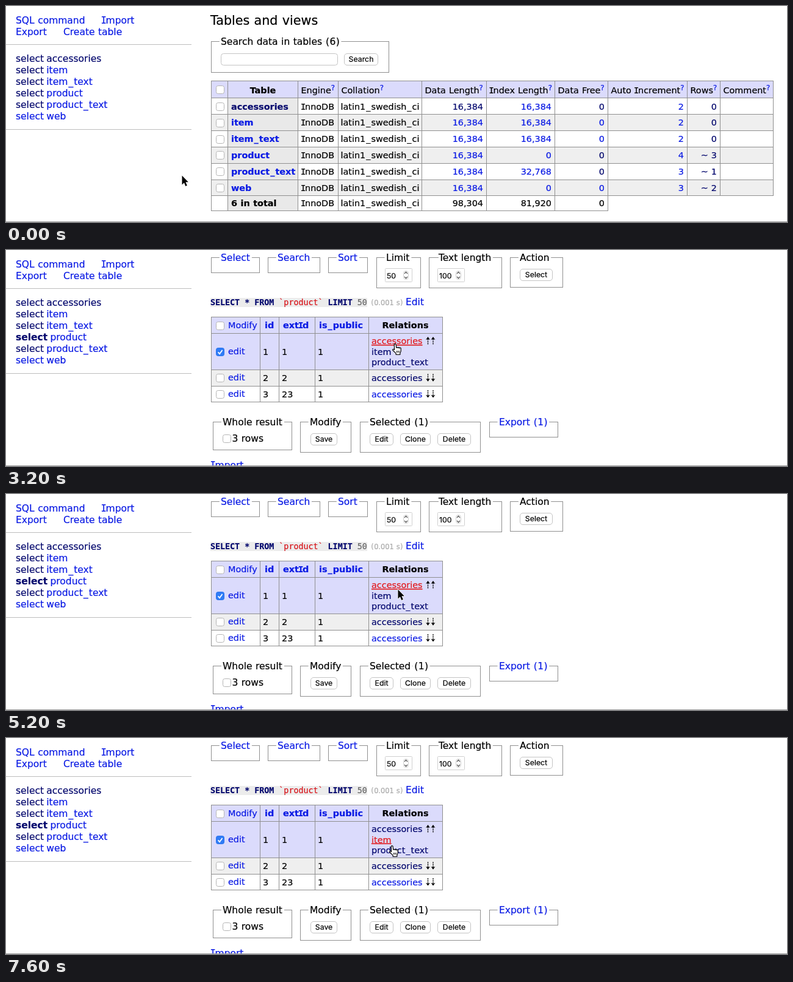
Write an HTML page that moves like this. It is 1280 px wide and 356 px high and loops after 8 s.

```html
<!DOCTYPE html>
<html lang="en">
<head>
<meta charset="utf-8">
<title>Database admin</title>
<style>
  html, body { margin: 0; width: 100%; height: 100%; overflow: hidden; background: #fff; }
  svg { display: block; width: 1280px; height: 356px; }
  text { font: 15.5px "DejaVu Sans", sans-serif; word-spacing: .034em; white-space: pre; color: #000; }
  text, tspan { fill: currentColor; stroke: currentColor; stroke-width: .2px; }
  rect, .line { shape-rendering: crispEdges; }
  .round { shape-rendering: auto; }
  .t { font-size: 14.4px; }
  .h { font-size: 20.7px; }
  .b { font-weight: bold; }
  .u { font: 12.3px Inter, sans-serif; word-spacing: 0; }
  .m { font: 13.34px "DejaVu Sans Mono", monospace; word-spacing: 0; }
  .s { font-size: 11.4px; color: #aaa; }
  .l { color: #0b1be4; }
  .v { color: #05096e; }
  .hot { color: #e2191c; text-decoration: underline; }
  .r { color: #d8141a; }
  .g { color: #666; }
  .off { color: #bdbdbd; }
  .end { text-anchor: end; }
  .mid { text-anchor: middle; }
  .halo { color: #fff; stroke-width: 8px; stroke-linejoin: round; }
  .halo tspan { stroke-width: 8px; }
  .serif { font-family: "DejaVu Sans Mono", monospace; }
</style>
</head>
<body>
<svg id="stage" viewBox="0 0 1280 356"></svg>
<script>
const stage = document.getElementById('stage');
const STEP = 400;
const HEAD = '#dbdbfc', STRIPE = '#efefef', GREY = '#e9e9e9', EDGE = '#8f8f8f';

// Side bearings, in em, that give some letters a wider setting; capital I takes a serif form.
const BEARING = { '_': .07, '(': .032, ')': .032, 'I': -.09 };
const spaced = s => String(s).replace(/[_()I]/g, c =>
  `<tspan dx="${BEARING[c]}em" style="letter-spacing:${BEARING[c]}em" class="${c === 'I' ? 'serif' : ''}">${c}</tspan>`);

const text = (x, y, s, cls = '') =>
  `<text x="${x}" y="${y}" class="${cls}">${/\b[um]\b/.test(cls) ? s : spaced(s)}</text>`;
const rect = (x, y, w, h, fill, more = '') =>
  `<rect x="${x}" y="${y}" width="${w}" height="${h}" fill="${fill}" ${more}/>`;
const path = (d, more) => `<path d="${d}" ${more}/>`;
const line = (x1, y1, x2, y2, color = EDGE) =>
  path(`M${x1} ${y1}L${x2} ${y2}`, `class="line" stroke="${color}" fill="none"`);
const round = (x, y, w, h, r, edge = '#c4c4c4', fill = '#fff') =>
  rect(x + .5, y + .5, w - 1, h - 1, fill, `rx="${r}" stroke="${edge}" class="round"`);

const fieldset = (x, y, w, h, legend, cls = '') =>
  rect(x + .5, y + .5, w, h, 'none', `stroke="${EDGE}"`) +
  text(x + 16, y + 6, legend, 'halo') + text(x + 16, y + 6, legend, cls);
const button = (x, y, w, label, off) =>
  round(x, y, w, 20, 4.5) + text(x + w / 2, y + 14.4, label, 'u mid' + (off ? ' off' : ''));
const check = (x, y, on) => on
  ? round(x, y, 14, 14, 3, '#2a74ee', '#2f7cf6') +
    path(`M${x + 3.6} ${y + 7.4}l2.5 2.8l4.4 -6.2`, 'fill="none" stroke="#fff" stroke-width="1.8"')
  : round(x, y, 14, 14, 3, '#b4b4b4');
const chevrons = (x, y, color) =>
  path(`M${x - 2.6} ${y - 2.4}l2.6 -2.8l2.6 2.8M${x - 2.6} ${y + 2.4}l2.6 2.8l2.6 -2.8`,
    `fill="none" stroke="${color}" stroke-width="1.3"`);
const number = (x, n) => round(x, 30, 45, 23, 1, '#d0d0d0') +
  text(x + 3, 46.5, n, 'u') + round(x + 30, 34, 9, 15, 4, '#cfcfcf') + chevrons(x + 34.5, 41.5, '#555');
const dropdown = (x, y, w, label) =>
  round(x, y, w, 20, 4.5) +
  path(`M${x + w - 17} ${y}h12.5a4.5 4.5 0 0 1 4.5 4.5v11a4.5 4.5 0 0 1 -4.5 4.5h-12.5z`, 'fill="#3a83f7"') +
  chevrons(x + w - 8.5, y + 10, '#fff') + text(x + 8, y + 14, label, 'u');

function arrows(y, up) {
  const one = x => `<g transform="translate(${x} ${y}) scale(1 ${up ? -1 : 1})">` +
    path('M0 -6V3', 'stroke="#000" stroke-width="1.3" stroke-dasharray="2.2 1"') +
    path('M-3.4 1.6L0 2.8L3.4 1.6L0 6.4z', 'fill="#000"') + '</g>';
  return one(691.5) + one(700);
}

// Cell borders; the last row may stop at an earlier column.
function grid(xs, ys, fills, lastX = xs[xs.length - 1]) {
  const left = xs[0], right = xs[xs.length - 1], last = ys.length - 1;
  let out = '';
  fills.forEach((f, i) => { if (f) out += rect(left, ys[i], right - left, ys[i + 1] - ys[i], f); });
  ys.forEach((y, i) => out += line(left, y + .5, (i === last ? lastX : right) + 1, y + .5));
  xs.forEach(x => out += line(x + .5, ys[0], x + .5, ys[x <= lastX ? last : last - 1]));
  return out;
}

const names = ['accessories', 'item', 'item_text', 'product', 'product_text', 'web'];

function sidebar(current, hover) {
  let out = text(16, 28.5, 'SQL command', 'l') + text(157, 28.5, 'Import', 'l') +
    text(16, 47.5, 'Export', 'l') + text(94, 47.5, 'Create table', 'l') +
    line(0, 63.5, 304, 63.5, '#bdbdbd') + line(0, 203.5, 304, 203.5, '#bdbdbd');
  names.forEach((name, i) => {
    const y = 92.3 + i * 18.85, bold = name === current;
    out += text(16, y, 'select', hover === 'side ' + name ? 'hot' : (name === 'web' ? 'l' : 'v') + (bold ? ' b' : ''));
    out += text(bold ? 72.5 : 66.3, y, name, i ? 'l' : 'v');
  });
  return out;
}

function home({ hover }) {
  const xs = [336, 363, 478, 544, 681, 787, 899, 986, 1116, 1170, 1257];
  const ys = [123, 151, 178, 205, 232, 259, 286, 312, 337];
  const heads = ['Engine', 'Collation', 'Data Length', 'Index Length', 'Data Free', 'Auto Increment', 'Rows', 'Comment'];
  const index = ['16,384', '16,384', '16,384', '0', '32,768', '0'];
  const free = ['v', 'l', 'l', 'v', 'v', 'l'];
  const auto = [2, 2, 2, 4, 3, 3], rows = ['0', '0', '0', '~ 3', '~ 1', '~ 2'];
  let out = sidebar('', hover) + text(335, 31, 'Tables and views', 'h') +
    fieldset(336, 58, 291, 51, 'Search data in tables (6)') +
    round(352, 78, 192, 20, 4) + button(554, 78, 56, 'Search');
  out += grid(xs, ys, [HEAD, 0, STRIPE, 0, STRIPE, 0, STRIPE, 0], 986);
  out += rect(364, 152, 114, 185, GREY);
  ys.slice(1).forEach(y => out += line(363, y + .5, 479, y + .5));
  out += check(344, 131) + text(421, 144, 'Table', 't b mid');
  heads.forEach((h, i) => out += text(xs[i + 2] + 5.5, 144.3,
    h + '<tspan dy="-5" font-size="11.8" class="l">?</tspan>', 't'));
  for (let i = 0; i < 7; i++) {
    const y = i < 6 ? 170.5 + i * 26.8 : 330.3, last = i === 6;
    const num = (x, s, cls) => text(x, y, s, 't end ' + (last ? '' : cls));
    out += text(369, y, last ? '6 in total' : names[i], 't b ' + (last ? '' : i ? 'l' : 'v')) +
      text(484, y, 'InnoDB', 't') + text(548.5, y, 'latin1_swedish_ci', 't') +
      num(782, last ? '98,304' : '16,384', i ? 'l' : 'v') +
      num(894, last ? '81,920' : index[i], 'l') + num(981, '0', free[i]);
    if (!last) out += check(344, Math.round(y - 11.5)) + num(1111, auto[i], 'l') + num(1165, rows[i], 'v');
  }
  return out;
}

// Form controls above a result; dx is the room taken by the search form.
function controls(dx, withLength) {
  const action = 826 + dx - (withLength ? 0 : 132);
  let out = fieldset(336, 12, 79, 25, 'Select', 'l') +
    fieldset(429, 12, dx ? 445 : 85, dx ? 76 : 25, 'Search', 'l') +
    fieldset(528 + dx, 12, 64, 25, 'Sort', 'l') +
    fieldset(607 + dx, 12, 72, 50, 'Limit') + number(621 + dx, 50) +
    fieldset(action, 12, 86, 49, 'Action') + button(action + 16, 31, 54, 'Select');
  if (withLength) out += fieldset(693 + dx, 12, 119, 50, 'Text length') + number(707 + dx, 100);
  if (dx) {
    out += ['product_id', '(anywhere)'].map((label, i) => {
      const y = 31 + i * 26;
      return dropdown(445, y, 100, label) + dropdown(550, y, 112, '=') + round(668, y, 191, 20, 4);
    }).join('') + text(679, 46, '1', 'u') + '<circle cx="845.5" cy="41.5" r="6" fill="#666"/>' +
      path('M843.3 39.3l4.4 4.4M847.7 39.3l-4.4 4.4', 'stroke="#fff" stroke-width="1.4"');
  }
  return out;
}

function query(y, table, where, time) {
  const parts = [['b v', 'SELECT * FROM '], ['r', '`' + table + '`']];
  if (where) parts.push(['b v', ' WHERE '], ['r', '`product_id`'], ['', " = '1'"]);
  parts.push(['b v', ' LIMIT '], ['g', '50']);
  const end = 335 + parts.reduce((n, p) => n + p[1].length, 0) * 8.03;
  return rect(335, y - 12, end - 335, 15, '#ececec') +
    text(335, y, parts.map(([c, s]) => `<tspan class="${c}">${s}</tspan>`).join(''), 'm') +
    text(end + 6, y, `(${time} s)`, 's') + text(end + 63, y, 'Edit', 'l');
}

function footer(dy, rows, picked, exported) {
  const y = 250 + dy;
  let out = fieldset(339, y, 129, 46, 'Whole result') + check(355, y + 21) + text(370.5, y + 33, rows) +
    fieldset(482, y, 83, 50, 'Modify') + button(499, y + 19, 44, 'Save') +
    fieldset(580, y, 197, 50, `Selected (${picked})`) +
    fieldset(792, y, 112, 25, `Export (${exported})`, 'l') + text(336, y + 76.8, 'Import', 'l');
  [['Edit', 596, 39], ['Clone', 646, 50], ['Delete', 707, 55]].forEach(([s, x, w]) => out += button(x, y + 19, w, s, !picked));
  return out;
}

const tableHead = y => check(344, y - 11) + text(364, y - .5, 'Modify', 't l') + text(424, y, 'id', 't b l');

function product({ open, hover, row }) {
  const dy = open ? 33 : 0;
  const fills = [HEAD, open ? HEAD : row === 1 ? GREY : 0, STRIPE, 0];
  const rel = (key, y, name, cls) => text(599, y, name, 't ' + (hover === key ? 'hot' : cls));
  let out = sidebar('product') + controls(0, true) + query(91, 'product', false, '0.001') +
    grid([336, 416, 447, 506, 594, 715], [110, 137, 164 + dy, 191 + dy, 217 + dy], fills) +
    tableHead(129) + text(454, 129, 'extId', 't b l') + text(513, 129, 'is_public', 't b l') +
    text(616.5, 129, 'Relations', 't b');
  ['1', '2', '23'].forEach((ext, i) => {
    const y = 156 + i * 26.8 + (i ? dy : open ? 16.5 : 0);
    const ry = open && !i ? 155 : y;
    out += check(344, Math.round(y - 12), open && !i) + text(364, y - .8, 'edit', 't l') +
      text(421, y, i + 1, 't') + text(452, y, ext, 't') + text(511, y, '1', 't') +
      rel('rel' + i, ry, 'accessories', i === 2 ? 'l' : 'v') + arrows(ry - 5.5, open && !i);
  });
  if (open) out += rel('item', 172.5, 'item', 'v') + rel('text', 190, 'product_text', 'v');
  return out + footer(dy, '3 rows', open ? 1 : 0, open ? 1 : 3);
}

function related(table, { hover, row }) {
  const acc = table === 'accessories';
  return sidebar(table) + controls(360, acc) + query(116.5, table, true, acc ? '0.000' : '0.001') +
    grid([336, 416, 447, 550, acc ? 631 : 641], [135, 162, 189], [HEAD, row ? GREY : 0]) +
    tableHead(154.5) + text(454, 154.5, 'product_id', 't b l') +
    (acc ? text(590, 154.5, 'type', 't b l mid') : text(557.5, 154.5, 'Relations', 't b')) +
    check(344, 169) + text(364, 180.5, 'edit', 't l') + text(421, 181.3, '1', 't') +
    text(452, 181.3, '1', 't ' + (hover === 'one' ? 'hot' : 'l')) +
    text(555, 181.3, acc ? 'CHARGER' : 'item_text', acc ? 't' : 't l') +
    footer(-29, '1 row', 0, 1);
}

const list = s => product(s);
const detail = s => product({ ...s, open: true });
const accessories = s => related('accessories', s);
const item = s => related('item', s);

// Back gesture: the upper page slides off the dimmed one below.
const swipe = () => detail({ hover: 'rel0' }) + rect(0, 0, 1280, 356, '#000', 'opacity=".08"') +
  '<g transform="translate(640)">' + rect(-6, 0, 6, 356, '#000', 'opacity=".07"') +
  rect(0, 0, 1280, 356, '#fff') + accessories({}) + '</g>';

// Page, pointer x and y, hovered link, hovered row, hand pointer.
const steps = [
  [home, 288, 279], [home, 150, 205], [home, 41, 142, 'side product', 0, 1], [list, 45, 142],
  [list, 674, 172, 'rel1', 2, 1], [list, 695, 177, '', 2, 1], [list, 694, 151, '', 1, 1], [detail, 694, 151, '', 1, 1],
  [detail, 633, 154, 'rel0', 1, 1], [accessories, 640, 157], [accessories, 633, 176], [accessories, 455, 184, 'one', 1, 1],
  [swipe, 600, 165], [detail, 642, 157, 'rel0'], [detail, 628, 177, 'item', 1, 1], [detail, 628, 177, 'item', 1, 1],
  [item, 630, 178], [item, 411, 187, '', 1], [detail, 630, 178, 'item'], [detail, 628, 177, 'item', 1, 1]
];

function pointer(x, y, hand) {
  const shape = hand
    ? path('M3.6 10.6L3.3 2.2a1.4 1.4 0 0 1 2.8 -.2l.6 5.2a1.35 1.35 0 0 1 2.6 .2a1.3 1.3 0 0 1 2.5 .5a1.2 1.2 0 0 1 2.4 .8v4l-1.4 3.2v2.6h-6.6v-2.1L.9 11.3a1.3 1.3 0 0 1 1.7 -1.8z',
        'fill="#fff" stroke="#000" stroke-width="1.2" stroke-linejoin="round"') +
      path('M7.3 12v3.2M9.3 12v3.2M11.3 12v3.2', 'stroke="#000" stroke-width=".9"')
    : path('M.5 .5V15.4L3.9 12.3L6.3 17.9L8.8 16.8L6.4 11.3H10.8z',
        'fill="#000" stroke="#fff" stroke-width="1.4" paint-order="stroke"');
  return `<g transform="translate(${x} ${y})">${shape}</g>`;
}

function render(step) {
  const [page, x, y, hover, row, hand] = steps[step];
  stage.innerHTML = rect(0, 0, 1280, 356, '#fff') + page({ hover, row }) +
    rect(0, 355, 1280, 1, '#9b9b9b') + pointer(x, y, hand);
}

let shown = -1;
const start = performance.now();
function tick() {
  const step = Math.floor((performance.now() - start) / STEP) % steps.length;
  if (step !== shown) render(shown = step);
  requestAnimationFrame(tick);
}
tick();
</script>
</body>
</html>
```
